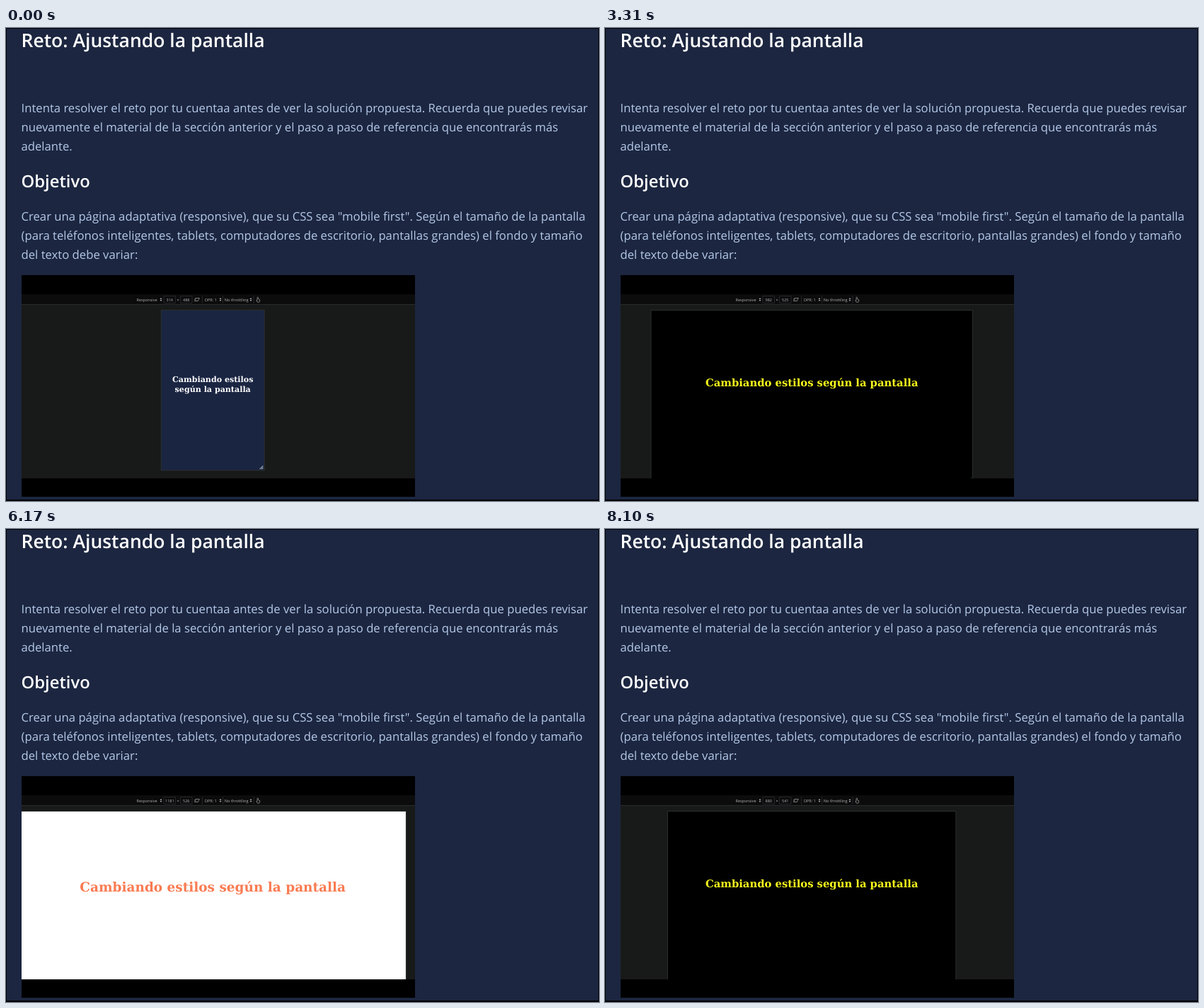
An HTML page that plays this animation: 838 px wide and 668 px high, repeating every 8.25 s.

```html
<!DOCTYPE html>
<html lang="es">
<head>
<meta charset="utf-8">
<title>Reto: Ajustando la pantalla</title>
<style>
  html, body { margin: 0; width: 100%; height: 100%; overflow: hidden; background: #1c2640; }
  svg { position: absolute; left: 0; top: 0; text-rendering: geometricPrecision; }
  svg text { font-family: "Open Sans", sans-serif; white-space: pre; }
  .body { font-size: 16.7px; fill: #b4c8e8; }
  .head { font-weight: 600; fill: #fff; }
  .bar { font-size: 5.5px; fill: #b4b4b6; }
  .mid { text-anchor: middle; }
  .line { fill: none; stroke: #a8a8aa; stroke-width: .7; }
  .box { fill: none; stroke: #2c2c30; stroke-width: .8; }
  #stage { position: absolute; left: 22px; top: 391px; width: 556px; height: 245px; overflow: hidden; background: #181a19; }
  #view { position: absolute; top: 8px; padding-top: 180px; box-sizing: border-box; overflow: hidden;
    transform-origin: 0 0; box-shadow: 0 0 0 2px #2d312f; text-rendering: geometricPrecision; }
  #view h1 { margin: .67em 8px; font: bold 1em "DejaVu Serif", serif; text-align: center; }
  #grip { position: absolute; right: 3px; bottom: 3px; width: 12px; height: 12px;
    background: linear-gradient(135deg, transparent 50%, #747d90 50%); }
</style>
</head>
<body>
<svg width="838" height="668" viewBox="0 0 838 668">
  <path d="M0 0H838V668H0Z M1 1V666H837V1Z" fill="#000"/>
  <text class="head" x="21.5" y="26.5" font-size="26.5">Reto: Ajustando la pantalla</text>
  <g class="body">
    <text x="21.5" y="119.3">Intenta resolver el reto por tu cuentaa antes de ver la solución propuesta. Recuerda que puedes revisar</text>
    <text x="21.5" y="146.2">nuevamente el material de la sección anterior y el paso a paso de referencia que encontrarás más</text>
    <text x="21.5" y="173">adelante.</text>
    <text x="21.5" y="272.3">Crear una página adaptativa (responsive), que su CSS sea "mobile first". Según el tamaño de la pantalla</text>
    <text x="21.5" y="299.2">(para teléfonos inteligentes, tablets, computadores de escritorio, pantallas grandes) el fondo y tamaño</text>
    <text x="21.5" y="326">del texto debe variar:</text>
  </g>
  <text class="head" x="21.5" y="225" font-size="23.8">Objetivo</text>

  <rect x="22" y="349" width="556" height="313"/>
  <rect x="22" y="376" width="556" height="14" fill="#0c0c0d"/>
  <rect x="22" y="390" width="556" height="1" fill="#2a2b2c"/>
  <g class="bar">
    <text x="184.5" y="385.5">Responsive</text>
    <text x="281" y="385.5">DPR: 1</text>
    <text x="308.7" y="385.5" font-size="5.7">No throttling</text>
    <text class="mid" x="243" y="385.5">×</text>
    <text class="mid" x="231.3" y="385.5" id="wide"></text>
    <text class="mid" x="254.8" y="385.5" id="tall"></text>
    <path d="M217.6 383l1.4-2 1.4 2z m0 1l1.4 2 1.4-2z M301.6 383l1.4-2 1.4 2z m0 1l1.4 2 1.4-2z M344.6 383l1.4-2 1.4 2z m0 1l1.4 2 1.4-2z"/>
  </g>
  <path class="box" d="M223 378.5h16.5v10H223z M246.5 378.5H263v10h-16.5z M277.5 378v11 M306.5 378v11 M350 378v11"/>
  <path class="line" d="M268.5 381.5h4.8l-2 4h-4.8z M266.6 383.5l1-2"/>
  <path class="line" d="M355 384.5v-4q.8-1 1.4 0v2.2l2.2.8v2.5l-.8 1.2h-2.4l-1.6-2.4z"/>
</svg>
<div id="stage"><div id="view"><h1>Cambiando estilos según la pantalla</h1><div id="grip"></div></div></div>
<script>
const LOOP = 8250, SCALE = 0.4618, CENTER = 270.2;

// time, viewport width, viewport height
const keys = [
  [0, 314, 488], [560, 357, 491], [1060, 453, 496], [1230, 502, 498], [2080, 742, 512],
  [3160, 968, 524], [3310, 982, 525], [4390, 1144, 527], [5400, 1220, 527],
  [5780, 1220, 527], [6790, 1090, 524], [7870, 940, 536], [8100, 880, 541]
];

const bursts = [
  [0, 0, 1], [70, 1060, 10], [1140, 1230, 2], [1290, 2080, 9], [2240, 3160, 11], [3310, 3310, 1],
  [3390, 4310, 10], [4390, 4390, 1], [4460, 5400, 9], [5780, 6790, 11], [6870, 7870, 10], [7950, 8100, 3]
];

// minimum width, background, text colour, font size
const styles = [
  [1200, '#000', '#fbc5cb', 48],
  [992, '#fff', '#f97b52', 40],
  [768, '#000', '#f8f81c', 32],
  [0, '#1a2542', '#fff', 24]
];

const byId = id => document.getElementById(id);
const view = byId('view'), grip = byId('grip'), wide = byId('wide'), tall = byId('tall');

function snap(t) {
  const [start, end, count] = bursts.findLast(b => b[0] <= t);
  if (count === 1) return start;
  const step = (end - start) / (count - 1);
  return Math.min(end, start + Math.floor((t - start) / step + 1e-6) * step);
}

function sizeAt(t) {
  const next = keys.findIndex(k => k[0] > t);
  if (next < 0) return keys.at(-1).slice(1);
  const a = keys[next - 1], b = keys[next], p = (t - a[0]) / (b[0] - a[0]);
  return [1, 2].map(i => Math.round(a[i] + (b[i] - a[i]) * p));
}

function draw(t) {
  const [w, h] = sizeAt(snap(t));
  const [, background, color, size] = styles.find(s => w >= s[0]);
  Object.assign(view.style, {
    width: w + 'px', height: h + 'px', background, color, fontSize: size + 'px',
    transform: `translateX(${CENTER - w * SCALE / 2}px) scale(${SCALE})`
  });
  wide.textContent = w;
  tall.textContent = h;
}

function tick() {
  draw(performance.now() % LOOP);
  requestAnimationFrame(tick);
}
tick();
</script>
</body>
</html>
```
